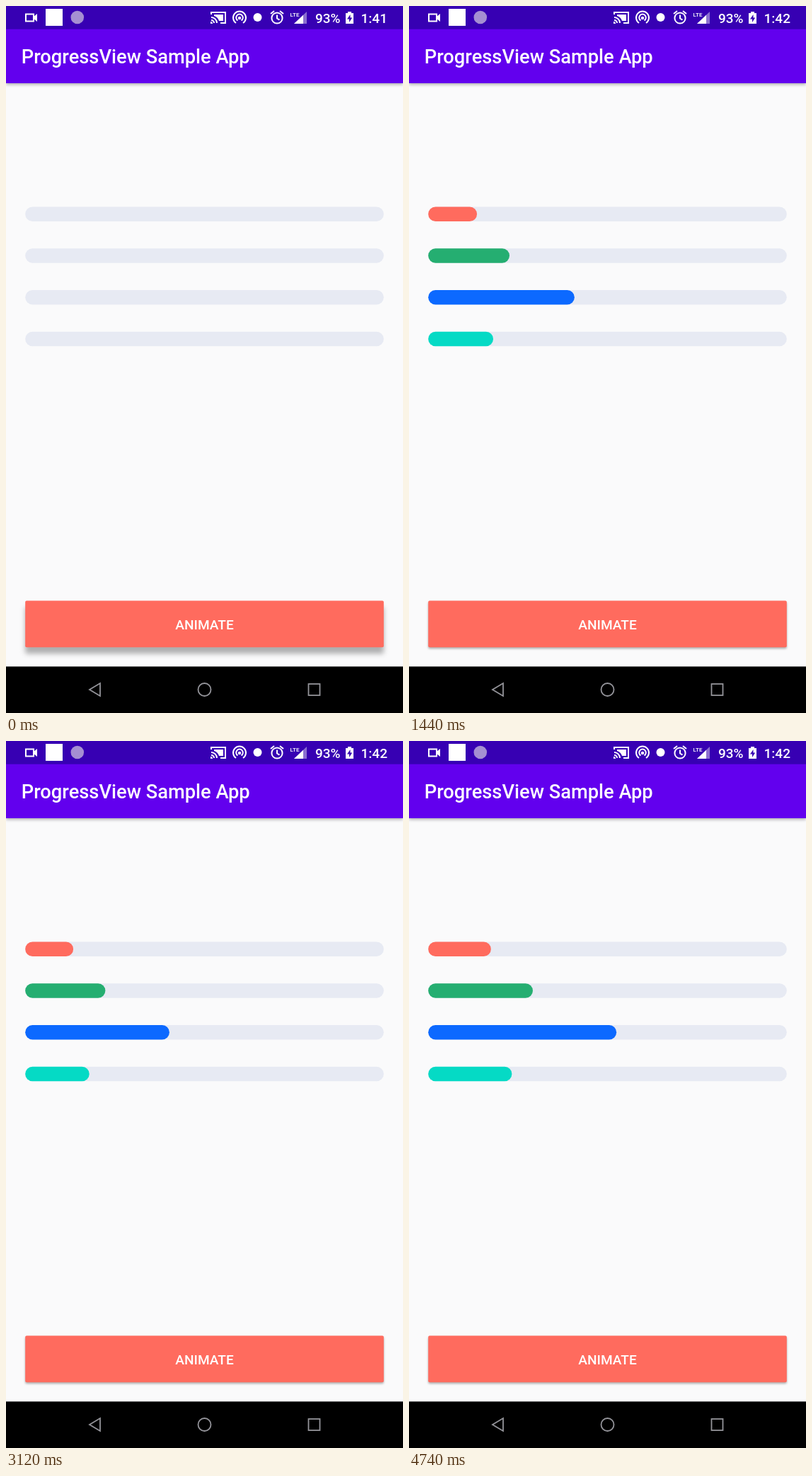
Recreate the animation shown at these times as an HTML page. Size 561 by 998 pixels, loop 4.8 s.

```html
<!DOCTYPE html>
<html lang="en">
<head>
<meta charset="utf-8">
<title>Progress bars</title>
<style>
  html, body { margin: 0; height: 100%; overflow: hidden; background: #fafafb; }
  svg { display: block; width: 561px; height: 998px; }
  text { font-family: Roboto, sans-serif; font-weight: 500; fill: #fff; }
  .line { fill: none; stroke: #fff; stroke-width: 2; }
  .nav { fill: none; stroke: #94949a; stroke-width: 1.8; }
  #appbar { filter: drop-shadow(0 2px 2px rgba(0, 0, 0, .3)); }
</style>
</head>
<body>
<svg viewBox="0 0 561 998">
  <rect width="561" height="998" fill="#fafafb"/>
  <rect id="appbar" y="20" width="561" height="89" fill="#6200ee"/>
  <rect width="561" height="32.7" fill="#3700b3"/>
  <text x="21.8" y="81" font-size="27.27">ProgressView Sample App</text>

  <!-- status bar, left -->
  <path class="line" d="M28 11.5h11v10h-11z"/>
  <path fill="#fff" d="M39 15l5-4v11l-5-4z"/>
  <rect x="56" y="4" width="24" height="24" fill="#fff"/>
  <circle cx="100.8" cy="16" r="9.3" fill="#a58fd2"/>

  <!-- status bar, right -->
  <path class="line" d="M290 12v-3h20v15h-7M290 16a8 8 0 0 1 8 8M290 20a4 4 0 0 1 4 4"/>
  <path fill="#fff" d="M289 22a3 3 0 0 1 3 3h-3zM294 12h13v9h-6a11 11 0 0 0-7-7z"/>
  <path class="line" d="M325 24a9 9 0 1 1 10 0M327.5 20.5a4.8 4.8 0 1 1 5 0"/>
  <circle cx="330" cy="17" r="2.2" fill="#fff"/>
  <circle cx="355.5" cy="16" r="6" fill="#fff"/>
  <circle class="line" cx="383" cy="17" r="7.6"/>
  <path class="line" d="M383 12.5v5l3.5 2.2M374 11l5-4M392 11l-5-4"/>
  <text x="401.5" y="14.5" font-size="8">LTE</text>
  <path fill="#8b6fd0" d="M425 8v17h-18z"/>
  <path fill="#fff" d="M420 12.7v12.3h-13z"/>
  <text x="437" y="23.5" font-size="19">93%</text>
  <path fill="#fff" d="M480 10h3v-2h5v2h3v15h-11z"/>
  <path fill="#3700b3" d="M486.5 12l-4.500 6.500h3v4.500l4.200-6.500h-2.700z"/>
  <text id="clock" x="501.5" y="23.5" font-size="19"></text>

  <g id="bars"></g>

  <rect id="button" x="27.2" y="839.6" width="506.6" height="65.7" rx="2" fill="#ff6b5e"/>
  <text x="280.5" y="880.2" font-size="19.1" text-anchor="middle">ANIMATE</text>

  <rect y="932.4" width="561" height="66"/>
  <path class="nav" d="M118 965l15-9v18z"/>
  <circle class="nav" cx="280.5" cy="965" r="9"/>
  <rect class="nav" x="427.5" y="957" width="16" height="16"/>
</svg>
<script>
const LOOP = 4800, STEP = 60, RISE = 1300, FADE = 100, FULL = 506.6;
// Times at which the fill restarts; the first run is already under way after the opening cut
const taps = [-734, 733, 2423, 3830];
const clock = document.getElementById('clock');
const button = document.getElementById('button');
const group = document.getElementById('bars');

function addBar(y, fill, width) {
  const bar = document.createElementNS('http://www.w3.org/2000/svg', 'rect');
  const attrs = { x: 27.2, y, width, height: 20.5, rx: 10.25, fill };
  for (const key in attrs) bar.setAttribute(key, attrs[key]);
  return group.appendChild(bar);
}

const bars = [
  ['#ff6b5e', 3 / 12],
  ['#25ae71', 5 / 12],
  ['#0c69ff', 9 / 12],
  ['#05dac5', 4 / 12]
].map(([color, share], i) => {
  const y = 283.5 + i * 58.75;
  addBar(y, '#e7eaf3', FULL);
  return { fill: addBar(y, color, 0), width: FULL * share };
});

// Linear rise from the latest tap
function progress(t) {
  const start = taps.filter(tap => tap <= t).pop();
  return Math.min(1, (t - start) / RISE);
}

// The button's shadow grows and shrinks around each tap
function lift(t) {
  return Math.max(0, ...taps.map(tap => 1 - Math.abs(t - tap - 40) / FADE));
}

function draw(now) {
  const t = Math.floor(now % LOOP / STEP) * STEP;
  const opening = t < STEP;
  const p = opening ? 0 : progress(t);
  const h = opening ? 1 : lift(t);
  for (const bar of bars) bar.fill.setAttribute('width', bar.width * p);
  button.style.filter =
    `drop-shadow(0 ${2 + 7 * h}px ${1.5 + 2 * h}px rgba(0, 0, 0, .3))`;
  clock.textContent = t < 990 ? '1:41' : '1:42';
}

const origin = performance.now();
function tick() {
  draw(performance.now() - origin);
  requestAnimationFrame(tick);
}
tick();
</script>
</body>
</html>
```
